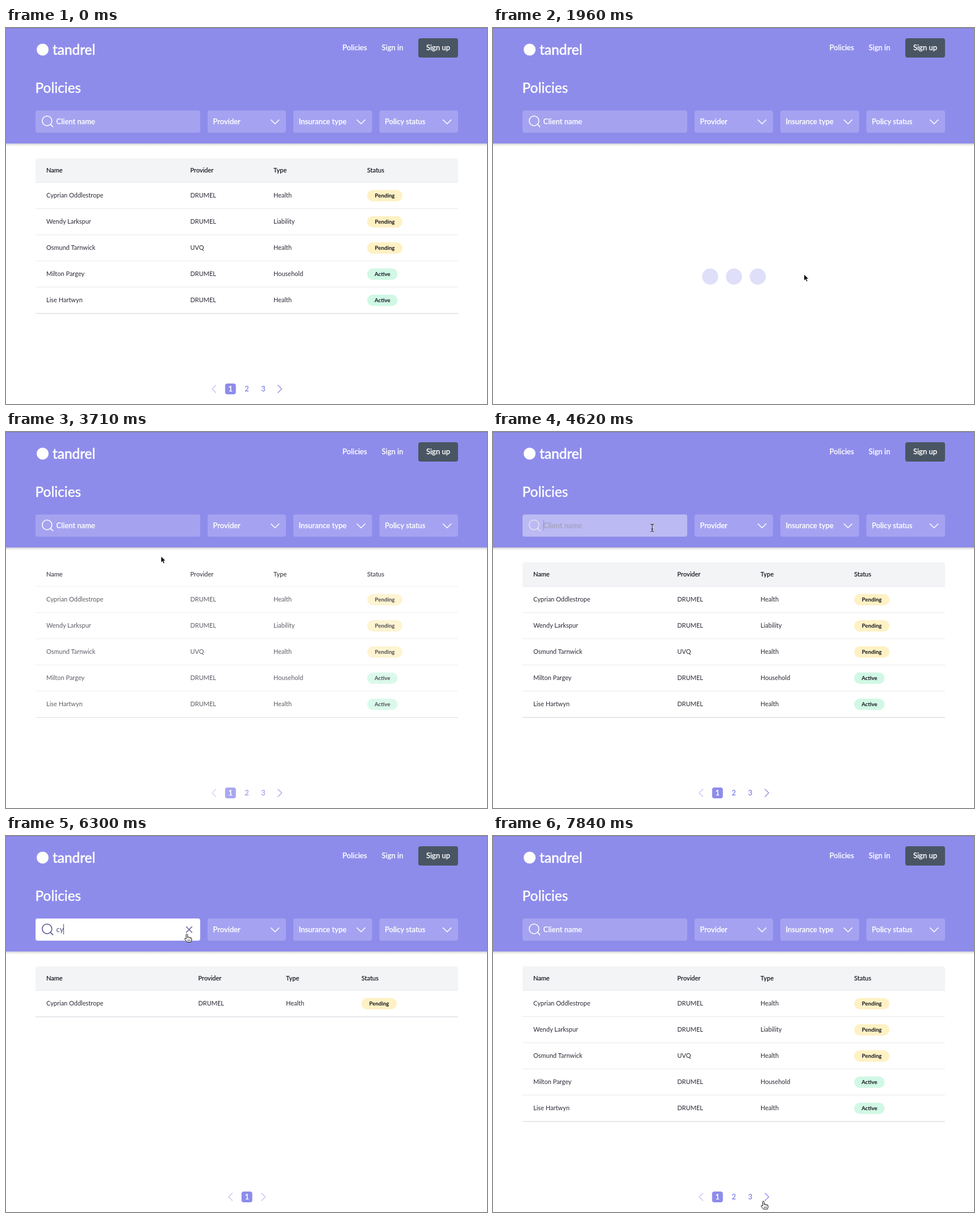
Write an HTML page that moves like this. It is 847 px wide and 661 px high and loops after 8000 ms.

```html
<!DOCTYPE html>
<html lang="en">
<head>
<meta charset="utf-8">
<title>Policies</title>
<style>
  html, body { margin: 0; width: 100%; height: 100%; overflow: hidden; background: #fff; }
  svg { display: block; width: 100%; height: 100%; font-family: Lato, "Open Sans", sans-serif; }
  .light { fill: #fff; stroke: #fff; stroke-width: .25; font-weight: 500; font-size: 13px; }
  .line { fill: none; stroke: #fff; stroke-width: 1.5; stroke-linecap: round; stroke-linejoin: round; }
  .head { font-size: 11px; font-weight: 500; fill: #15151f; stroke: #15151f; stroke-width: .12; }
  .cell { font-size: 11px; fill: #2a2a36; }
  .badge { font-size: 9.7px; font-weight: 700; fill: #15151f; text-anchor: middle; }
  .page { font-size: 13px; font-weight: 700; fill: #8e8ceb; text-anchor: middle; }
</style>
</head>
<body>
<svg id="stage" viewBox="0 0 847 661" preserveAspectRatio="none"></svg>
<script>
const LOOP = 8000;
const PURPLE = '#8e8ceb', PALE = '#c6c4f4';

const text = (x, y, s, cls, extra = '') => `<text x="${x}" y="${y}" class="${cls}" ${extra}>${s}</text>`;
const rect = (x, y, w, h, r, fill, extra = '') =>
  `<rect x="${x}" y="${y}" width="${w}" height="${h}" rx="${r}" fill="${fill}" ${extra}/>`;
const path = (d, extra = '') => `<path d="${d}" class="line" ${extra}/>`;

const select = (x, w, label) =>
  rect(x, 145, w, 39, 4, '#a5a3f1') + text(x + 9.5, 168.5, label, 'light') +
  path(`M${x + w - 26.3} 161.5l7 7 7-7`);

const header = () => `
  <defs><linearGradient id="shade" x2="0" y2="1">
    <stop stop-color="#000" stop-opacity=".17"/><stop offset="1" stop-color="#000" stop-opacity="0"/>
  </linearGradient></defs>
  ${rect(0, 203, 847, 5, 0, 'url(#shade)')}
  ${rect(0, 0, 847, 203, 0, PURPLE)}
  ${rect(0, 0, 847, 1, 0, '#7f7dc4')}
  <circle cx="64.5" cy="38" r="10.5" fill="#fff"/>
  ${text(82, 47, 'tandrel', 'light', 'style="font-size:24.3px;stroke-width:.5"')}
  ${text(592.5, 39, 'Policies', 'light')}
  ${text(661.5, 39, 'Sign in', 'light')}
  ${rect(726, 18, 70, 34, 4, '#4a5563')}
  ${text(761, 39, 'Sign up', 'light', 'text-anchor="middle"')}
  ${text(51.5, 114, 'Policies', 'light', 'style="font-size:24.3px"')}
  ${rect(52, 145, 290, 39, 4, '#fff', 'id="field"')}
  <g id="lens">${path('M78.4 169.4l4.2 4.2')}<circle cx="72.3" cy="163.3" r="8.5" class="line"/></g>
  ${text(88.5, 168.5, 'Client name', 'light', 'id="hint"')}
  ${text(88.5, 168.5, '', 'cell', 'id="query" style="font-size:13px;fill:#4b4a78"')}
  ${rect(0, 155, 1, 18, 0, '#4b4a78', 'id="caret"')}
  ${path('M317.5 159.5l10 10m0-10l-10 10', 'id="cross" style="stroke:#55528f;stroke-width:1.3"')}
  ${select(355, 138, 'Provider')}${select(506, 138.5, 'Insurance type')}${select(657.5, 138.5, 'Policy status')}`;

const badge = (x, y, status) => {
  const [w, fill] = status === 'Pending' ? [62, '#fef1c3'] : [53.5, '#d0f8e5'];
  return rect(x, y - 9.7, w, 20, 10, fill) + text(x + w / 2, y + 3.6, status, 'badge');
};

function table(id, cols, rows, pager) {
  const heads = ['Name', 'Provider', 'Type', 'Status'];
  let s = `<g id="${id}"><path class="bar" d="M52 271V234q0-5 5-5H791q5 0 5 5V271z" fill="#f3f4f6"/>`;
  s += heads.map((h, i) => text(cols[i], 254, h, 'head')).join('');
  s += rect(52, 271, 744, 1, 0, '#e8eaee');
  rows.forEach((row, r) => {
    const y = 294.5 + 46 * r, last = r === rows.length - 1;
    s += row.slice(0, 3).map((c, i) => text(cols[i], y + 3.8, c, 'cell')).join('');
    s += badge(cols[3], y, row[3]);
    s += rect(52, y + 22.5, 744, last ? 1.5 : 1, 0, last ? '#dfe1e6' : '#e8eaee');
  });
  return s + pager + '</g>';
}

const arrow = (x, dir, color) => path(`M${x} 628l${6.5 * dir} 6.5 ${-6.5 * dir} 6.5`, `style="stroke:${color};stroke-width:1.4"`);
const current = x => rect(x - 9.5, 625, 19, 19, 4, PURPLE) + text(x, 639, '1', 'page', 'style="fill:#fff"');

const rows = [
  ['Cyprian Oddlestrope', 'DRUMEL', 'Health', 'Pending'],
  ['Wendy Larkspur', 'DRUMEL', 'Liability', 'Pending'],
  ['Osmund Tarnwick', 'UVQ', 'Health', 'Pending'],
  ['Milton Pargey', 'DRUMEL', 'Household', 'Active'],
  ['Lise Hartwyn', 'DRUMEL', 'Health', 'Active']
];
const fullPager = arrow(369.5, -1, PALE) + current(395.3) + text(424, 639, '2', 'page') +
  text(453, 639, '3', 'page') + arrow(479, 1, PURPLE);
const onePager = arrow(398.5, -1, PALE) + current(424.2) + arrow(450, 1, PALE);

const dots = [382.4, 424.3, 466.2].map(x => `<circle cx="${x}" cy="437" r="14.2" fill="${PURPLE}"/>`).join('');
const beamPath = 'M-3-6.5Q0-6.5 0-5Q0-6.5 3-6.5M0-5V5M-3 6.5Q0 6.5 0 5Q0 6.5 3 6.5M-1.5 2h3';
const pointers = `
  <circle id="halo" r="17.5" fill="#000" fill-opacity=".14"/>
  <path id="arrow" d="M0 0V11.2L2.6 8.8 4.3 12.8 6.3 11.9 4.6 8H8z" fill="#000" stroke="#fff" stroke-width=".8"/>
  <g id="beam" fill="none">
    <path d="${beamPath}" stroke="#fff" stroke-width="2.2"/>
    <path d="${beamPath}" stroke="#111" stroke-width="1.1"/>
  </g>
  <g id="hand" stroke="#111" stroke-width="1" stroke-linejoin="round">
    <path d="M-1.3 8.5V1.3Q-1.3 0 0 0T1.3 1.3V5.2Q3.2 4.4 3.9 5.8 5.6 5 6.2 6.5 8.3 6 8.3 8V10.5Q8.3 12 7.2 14H.2Q-1.3 11.6-3.2 9.8-4.6 8-3 7.4-2.2 7.3-1.3 8.5z" fill="#fff"/>
    <path d="M1.3 5.2V7M3.9 5.8V7.4M6.2 6.5V8M1.6 9.5v2.6M3.6 9.5v2.6M5.6 9.5v2.6" fill="none" stroke-width=".8"/>
  </g>`;

document.getElementById('stage').innerHTML = header() +
  table('full', [71, 324.5, 471, 636], rows, fullPager) +
  table('found', [71, 338.5, 493, 626], rows.slice(0, 1), onePager) +
  `<g id="dots">${dots}</g>` + pointers;

const el = {};
document.querySelectorAll('[id]').forEach(n => el[n.id] = n);

const ramp = (t, a, b) => Math.min(1, Math.max(0, (t - a) / (b - a)));
const ease = (t, a, b) => { const p = ramp(t, a, b); return p * p * (3 - 2 * p); };
const mix = (a, b, p) => `rgb(${a.map((v, i) => Math.round(v + (b[i] - v) * p))})`;
const within = (t, a, b) => t >= a && t < b;
const show = (node, on) => node.style.display = on ? '' : 'none';
const fade = (node, o) => {
  show(node, o > 0);
  node.setAttribute('opacity', o);
  const bar = node.querySelector('.bar');
  if (bar) show(bar, o > .9);
};

// Pointer trips: waypoints are [time, x, y]; the pointer is hidden between trips.
const trips = [
  [[840, 436, 650], [1050, 547.7, 433], [2030, 547.7, 433], [2310, 799, -14]],
  [[2520, 795, -2], [2590, 799, -3]],
  [[3290, 740, 29], [3710, 273, 218.5], [4060, 296, 186], [4270, 280.3, 168.6], [4690, 280.3, 168.6]],
  [[5950, 282, 169], [6300, 318.5, 172.5], [6440, 323.5, 160], [6680, 323.5, 160], [6960, 468, 628]],
  [[7560, 480, 660], [7840, 476, 642], [LOOP, 476, 642]]
];
const clicks = [1260, 4410, 6580];

function pointer(t) {
  const trip = trips.find(p => within(t, p[0][0], p[p.length - 1][0]));
  if (!trip) return null;
  const i = trip.findIndex(p => p[0] > t), a = trip[i - 1], b = trip[i];
  const p = ease(t, a[0], b[0]);
  return [a[1] + (b[1] - a[1]) * p, a[2] + (b[2] - a[2]) * p];
}

function drawPointer(t) {
  const pos = pointer(t);
  let kind = '';
  if (pos) {
    const [x, y] = pos, inField = x > 52 && x < 342 && y > 145 && y < 184;
    kind = t > 7500 || (inField && t > 5000 && x > 308) ? 'hand' : inField ? 'beam' : 'arrow';
  }
  for (const k of ['arrow', 'beam', 'hand', 'halo']) {
    show(el[k], k === 'halo' ? pos && clicks.some(c => within(t, c, c + 70)) : k === kind);
    if (pos) el[k].setAttribute('transform', `translate(${pos})`);
  }
}

function drawField(t) {
  const focus = ease(t, 4460, 4960) * (1 - ease(t, 6580, 7080));
  const typed = within(t, 4690, 6580), focused = within(t, 4440, 6580);
  el.field.setAttribute('fill-opacity', .2 + .8 * focus);
  // The icon darkens later than the field brightens, so it stays visible.
  const ink = mix([255, 255, 255], [85, 82, 143], focus ** 1.3);
  el.lens.querySelectorAll('.line').forEach(n => n.style.stroke = ink);
  el.hint.style.fill = el.hint.style.stroke = focused ? '#a5a3ba' : '#fff';
  show(el.hint, !typed);
  show(el.cross, typed);
  el.query.textContent = typed ? (t < 4760 ? 'c' : 'cy') : '';
  show(el.caret, focused && !within(t, 5250, 5810) && !within(t, 6370, 6580));
  el.caret.setAttribute('x', t < 4690 ? 88.5 : t < 4760 ? 95 : 101);
  el.caret.setAttribute('opacity', t < 4690 ? .35 : 1);
}

function drawContent(t) {
  let full = 1;
  if (within(t, 1540, 3360)) full = 0;
  else if (within(t, 3360, 4000)) full = ease(t, 3330, 3890);
  else if (within(t, 4760, 6700)) full = 1 - ease(t, 4760, 4900);
  else if (t >= 6700) full = ease(t, 6700, 7140);
  fade(el.full, full);
  fade(el.found, ease(t, 4900, 5040) * (1 - ease(t, 6580, 6700)));
  const pulse = (1 + Math.cos((t - 2500) / 700 * Math.PI)) / 2;
  fade(el.dots, within(t, 1610, 3360) ? .17 + .8 * pulse : 0);
}

function draw(now) {
  const t = now % LOOP;
  drawContent(t);
  drawField(t);
  drawPointer(t);
}

const start = performance.now();
function tick() {
  draw(performance.now() - start);
  requestAnimationFrame(tick);
}
tick();
</script>
</body>
</html>
```
